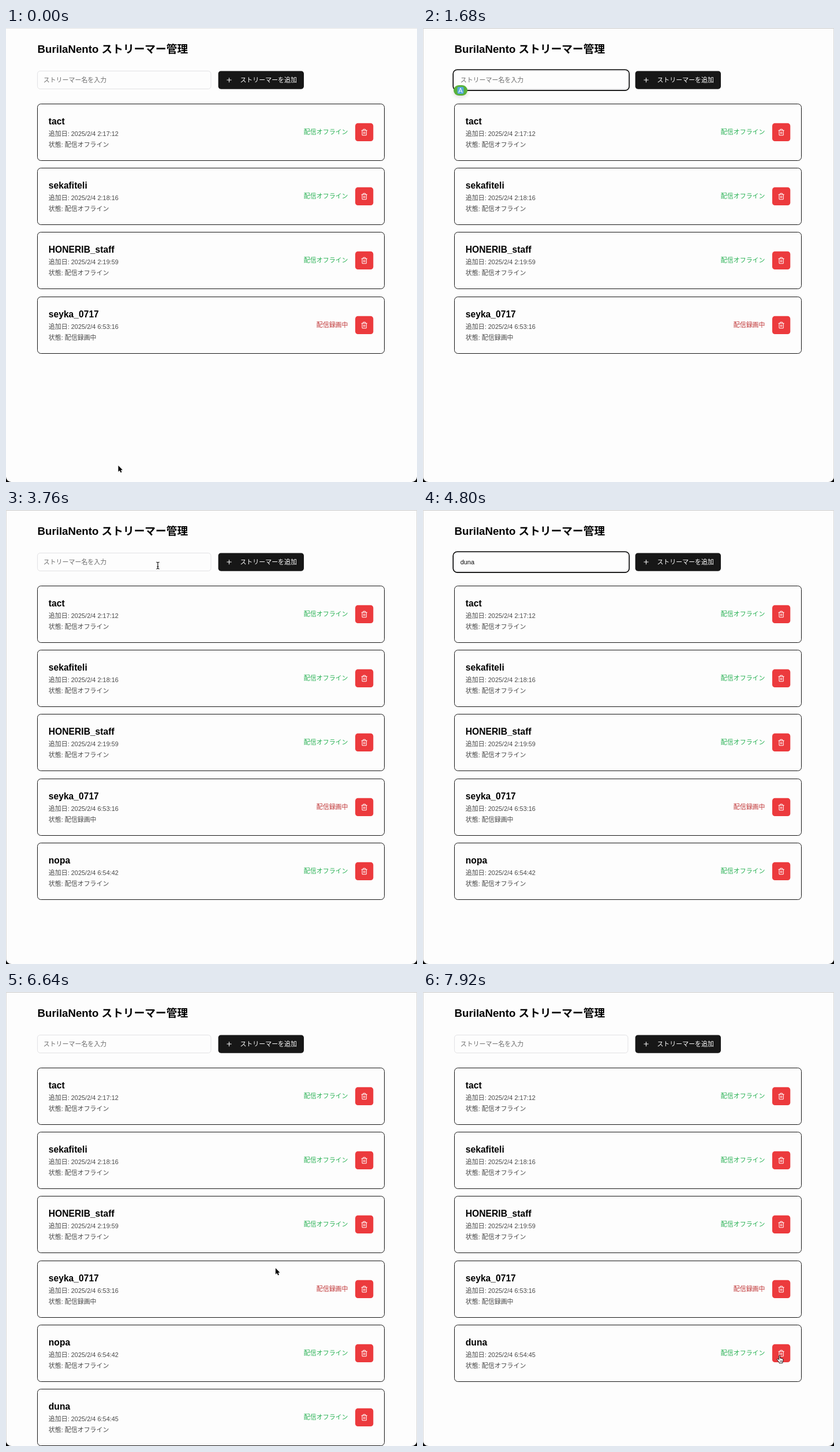
An HTML page for the animation above (8 s loop, 712x786 px).

```html
<!DOCTYPE html>
<html lang="ja">
<head>
<meta charset="utf-8">
<title>ストリーマー管理</title>
<style>
html, body { margin: 0; width: 100%; height: 100%; overflow: hidden; background: #000; }
svg { display: block; width: 712px; height: 786px; }
text { font: 10.96px "Liberation Sans", "Noto Sans CJK JP", "Noto Sans CJK", sans-serif; white-space: pre; }
.title { font-size: 18.7px; font-weight: 700; }
.name { font-size: 15.65px; font-weight: 700; }
.meta { fill: #484848; }
.icon { fill: none; stroke: #fff; stroke-width: 2; stroke-linecap: round; stroke-linejoin: round; }
.card { fill: #fdfdfd; stroke: #161616; }
</style>
</head>
<body>
<svg viewBox="0 0 712 786">
  <path d="M0 0H712V777a9 9 0 0 1-9 9H9a9 9 0 0 1-9-9Z" fill="#fdfdfd"/>
  <path id="topLine" d="M0 .5H712" stroke="#e4e4e4"/>
  <path id="sides" d="M.5 0V777a8.5 8.5 0 0 0 8.5 8.5M711.5 0V777a8.5 8.5 0 0 1-8.5 8.5" fill="none" stroke="#dadada"/>
  <text class="title" x="54.5" y="43">BurilaNento ストリーマー管理</text>

  <rect id="focus" x="52.2" y="72.2" width="305.1" height="35.9" rx="7" fill="#fdfdfd" stroke="#000" stroke-width="1.6"/>
  <rect x="54.5" y="74.5" width="300.5" height="31" rx="4.7" fill="#fdfdfd" stroke="#e2e2e4"/>
  <text id="field" x="64.7" y="93.6"></text>

  <g id="add">
    <rect id="addBox" x="367.7" y="74.4" width="148.3" height="31.3" rx="4.7"/>
    <g transform="translate(380.3 83.8) scale(.522)">
      <path id="plus" class="icon" d="M5 12H19M12 5V19"/>
      <path id="spinner" class="icon" d="M21 12a9 9 0 1 1-6.219-8.56"/>
    </g>
    <text id="addText" y="93.6" fill="#fff">ストリーマーを追加</text>
  </g>

  <g id="rows"></g>

  <g id="badge">
    <ellipse cx="65" cy="112" rx="12" ry="8" fill="#000" opacity=".12" style="filter:blur(3px)"/>
    <rect x="53" y="99" width="24" height="18" rx="9" fill="#58b13b"/>
    <rect x="59.5" y="102" width="11" height="12" rx="2" fill="#57a9dd"/>
    <text x="65" y="111.8" text-anchor="middle" fill="#fff">A</text>
  </g>

  <g id="ring" fill="none">
    <circle r="22.6" stroke="#fff" stroke-width="1.5"/>
    <circle r="23.8" stroke="#000" stroke-width="1.4"/>
  </g>
  <g id="cursor" stroke-linejoin="round">
    <path id="arrow" d="M.5.5V11.2L3 8.9 4.7 12.8 6.5 12 4.9 8.2H8Z" fill="#000" stroke="#fff" stroke-width=".9" paint-order="stroke"/>
    <g id="ibeam" fill="none">
      <path d="M-2.7-5.8Q0-5.8 0-4.4Q0-5.8 2.7-5.8M0-4.4V4.6M-2.7 6Q0 6 0 4.6Q0 6 2.7 6M-1.5 2H1.5" stroke="#fff" stroke-width="2.2"/>
      <path d="M-2.7-5.8Q0-5.8 0-4.4Q0-5.8 2.7-5.8M0-4.4V4.6M-2.7 6Q0 6 0 4.6Q0 6 2.7 6M-1.5 2H1.5" stroke="#000" stroke-width="1.1"/>
    </g>
    <g id="hand" transform="translate(1 1)" stroke="#000" stroke-width=".9">
      <path d="M-1 0a1 1 0 0 1 2 0V4L3 4.2 5 4.8 6.2 5.8V8.5L5.2 10.8V12.4H-.8V11.2L-3 8.3-4.2 6.4A1 1 0 0 1-2.5 5.4L-1 6.8Z" fill="#fff"/>
      <path d="M1 8V10.5M2.6 8V10.5M4.1 8V10.5" stroke-width=".7"/>
    </g>
  </g>
</svg>
<script>
const LOOP = 8000, STEP = 80;
const el = Object.fromEntries([...document.querySelectorAll('[id]')].map(e => [e.id, e]));

const OFF = { state: '配信オフライン', color: '#26b052' };
const REC = { state: '配信録画中', color: '#bf3334' };
const streamers = [
  { name: 'tact', time: '2:17:12', ...OFF },
  { name: 'sekafiteli', time: '2:18:16', ...OFF },
  { name: 'HONERIB_staff', time: '2:19:59', ...OFF },
  { name: 'seyka_0717', time: '6:53:16', ...REC },
  { name: 'nopa', time: '6:54:42', from: 3280, to: 7840, ...OFF },
  { name: 'duna', time: '6:54:45', from: 6000, ...OFF },
];

// Time spans in ms
const loads = [[3040, 3280], [5680, 6000], [7600, 7840]];
const presses = [[640, 800], [2800, 2960], [3840, 3920], [5520, 5680], [7440, 7600]];
const focused = [[640, 2800], [3840, 5520]];
const hidden = [[1360, 2400], [4160, 5200]];
const badges = [[1280, 1840], [4160, 4640]];
const entries = [['nopa', 1760, 3200], ['duna', 4560, 5840]];

// Pointer path: time, x, y
const path = [
  [0, 194, 757], [160, 194, 757], [320, 230, 74], [480, 230, 74], [640, 230, 90],
  [2320, 230, 90], [2640, 421, 88], [3280, 421, 88], [3600, 263, 96],
  [5120, 263, 96], [5440, 421, 88], [6160, 421, 88], [6320, 449, 460],
  [6480, 449, 460], [7280, 616.7, 629], [LOOP, 616.7, 629],
];

const during = (spans, t) => spans.find(([a, b]) => t >= a && t < b);
const inside = ([x, y], l, top, w, h) => x >= l && x <= l + w && y >= top && y <= top + h;
const show = (node, on) => { node.style.display = on ? '' : 'none'; };
const set = (node, attrs) => { for (const k in attrs) node.setAttribute(k, attrs[k]); };
const rowTop = i => Math.round(130.9 + 111.28 * i);

function pointerAt(t) {
  const i = path.findIndex(p => p[0] > t);
  const [t0, x0, y0] = path[i - 1], [t1, x1, y1] = path[i];
  const u = (t - t0) / (t1 - t0), e = u * u * (3 - 2 * u);
  return [x0 + (x1 - x0) * e, y0 + (y1 - y0) * e];
}

for (const s of streamers) {
  s.node = document.createElementNS('http://www.w3.org/2000/svg', 'g');
  s.node.innerHTML = `
    <rect class="card" x="54.5" y=".5" width="601" height="98" rx="6"/>
    <text class="name" x="73.8" y="36">${s.name}</text>
    <text class="meta" x="73.8" y="56">追加日: 2025/2/4 ${s.time}</text>
    <text class="meta" x="73.8" y="74.7">状態: ${s.state}</text>
    <text x="592.5" y="53" text-anchor="end" fill="${s.color}">${s.state}</text>
    <g class="delete">
      <rect x="605" y="33.8" width="31.3" height="31.3" rx="4.7" fill="#ec3a3d"/>
      <path class="icon" transform="translate(614.4 43.2) scale(.522)"
        d="M3 6H21M19 6V20a2 2 0 0 1-2 2H7a2 2 0 0 1-2-2V6M8 6V4a2 2 0 0 1 2-2H14a2 2 0 0 1 2 2V6M10 11V17M14 11V17"/>
    </g>`;
  s.button = s.node.querySelector('.delete');
  el.rows.append(s.node);
}

function draw(t) {
  const p = pointerAt(t);
  const load = during(loads, t);
  // Hover returns only once the pointer moves again after loading
  const canHover = !loads.some(([a, b]) => t >= a && t < b + 240);
  const onAdd = inside(p, 368, 74, 148, 32);
  let onDelete = false, row = 0;

  for (const s of streamers) {
    const on = t >= (s.from ?? 0) && t < (s.to ?? LOOP);
    show(s.node, on);
    if (!on) continue;
    const top = rowTop(row++);
    const over = inside(p, 605, top + 33, 32, 32);
    onDelete ||= over;
    set(s.node, { transform: `translate(0 ${top})` });
    set(s.button, { opacity: load ? .5 : over && canHover ? .9 : 1 });
  }

  show(el.sides, t >= 640);
  set(el.topLine, { stroke: t >= 640 ? '#c9c9c9' : '#e4e4e4' });
  show(el.focus, during(focused, t));

  const entry = entries.find(([, a, b]) => t >= a && t < b);
  el.field.textContent = entry
    ? entry[0].slice(0, 1 + Math.floor((t - entry[1]) / STEP)) : 'ストリーマー名を入力';
  set(el.field, { fill: entry ? '#0a0a0a' : '#6c6c6c' });

  set(el.add, { opacity: load ? .5 : 1 });
  set(el.addBox, { width: load ? 142 : 148.3, fill: onAdd && canHover ? '#2a2a2a' : '#171717' });
  set(el.addText, { x: load ? 399.2 : 405.4 });
  show(el.plus, !load);
  show(el.spinner, load);
  if (load) set(el.spinner, { transform: `rotate(${(t - load[0]) * .36} 12 12)` });

  const badge = badges.find(([a, b]) => t >= a && t < b + 160);
  show(el.badge, badge);
  if (badge) {
    const k = Math.min(1, (t - badge[0] + STEP) / 240, (badge[1] + 160 - t) / 160);
    set(el.badge, { opacity: k, transform: `translate(65 108) scale(${.6 + .4 * k}) translate(-65 -108)` });
  }

  const place = { transform: `translate(${p})` };
  set(el.ring, place);
  set(el.cursor, place);
  show(el.ring, during(presses, t));
  show(el.cursor, !during(hidden, t));
  const kind = inside(p, 54, 73, 301, 33) ? 'ibeam' : !load && (onAdd || onDelete) ? 'hand' : 'arrow';
  for (const k of ['arrow', 'ibeam', 'hand']) show(el[k], k === kind);
}

function tick() {
  draw(Math.floor(performance.now() % LOOP / STEP) * STEP);
  requestAnimationFrame(tick);
}
tick();
</script>
</body>
</html>
```
